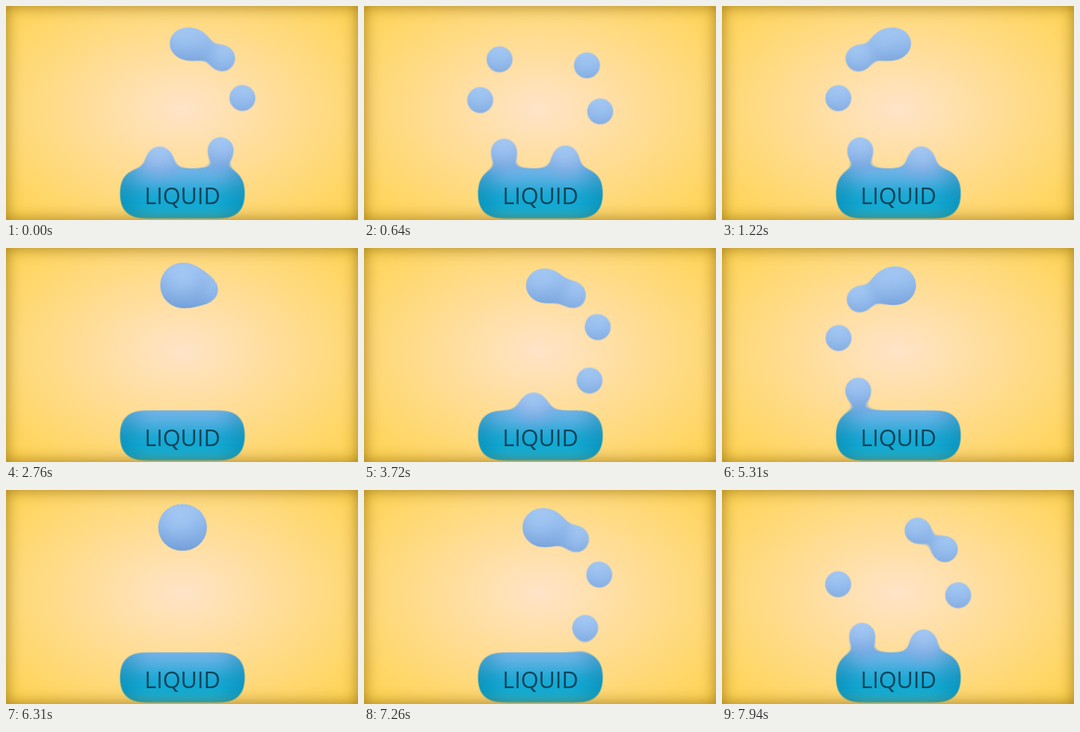
Animation, 467 px wide and 284 px high, one loop 8000 ms. Source, as an HTML page:

```html
<!DOCTYPE html>
<html lang="en">
<head>
<meta charset="utf-8">
<title>Liquid button</title>
<style>
  html, body { margin: 0; width: 100%; height: 100%; overflow: hidden; }
  body {
    background: radial-gradient(ellipse farthest-corner at 50% 48%, #ffe4c8, #ffd34e);
  }
  body::after {
    content: "";
    position: fixed;
    inset: 0;
    box-shadow: inset 0 0 20px rgba(120, 85, 0, .68);
  }
  svg { position: absolute; left: 0; top: 0; display: block; }
  text { font: 400 30.4px "Open Sans", sans-serif; fill: #0b4459; }
</style>
</head>
<body>
<svg width="467" height="284" viewBox="0 0 467 284">
  <defs>
    <filter id="soft" filterUnits="userSpaceOnUse" x="-50" y="-50" width="567" height="400" color-interpolation-filters="sRGB">
      <feGaussianBlur stdDeviation="11.4"/>
    </filter>
    <!-- Steep alpha ramp turns the overlapping soft shapes into one liquid surface -->
    <filter id="goo" filterUnits="userSpaceOnUse" x="0" y="0" width="467" height="284" color-interpolation-filters="sRGB">
      <feColorMatrix values="1 0 0 0 0  0 1 0 0 0  0 0 1 0 0  0 0 0 14 -6.5"/>
    </filter>
    <radialGradient id="water" cx=".5" cy=".36" r=".66">
      <stop offset="0" stop-color="#b6d6fb"/>
      <stop offset=".5" stop-color="#9dc3f1"/>
      <stop offset="1" stop-color="#5687cb"/>
    </radialGradient>
    <linearGradient id="pool" x2="0" y2="1">
      <stop offset="0" stop-color="#86b4ee"/>
      <stop offset=".2" stop-color="#66b2e4"/>
      <stop offset=".5" stop-color="#10a6d2"/>
      <stop offset=".75" stop-color="#0aa8d2"/>
      <stop offset="1" stop-color="#2cbce0"/>
    </linearGradient>
    <linearGradient id="ends">
      <stop offset="0" stop-color="#00789f" stop-opacity=".5"/>
      <stop offset=".2" stop-color="#00789f" stop-opacity="0"/>
      <stop offset=".8" stop-color="#00789f" stop-opacity="0"/>
      <stop offset="1" stop-color="#00789f" stop-opacity=".5"/>
    </linearGradient>
  </defs>
  <g id="liquid" filter="url(#goo)">
    <g filter="url(#soft)">
      <rect x="151" y="215.500" width="166" height="66.500" rx="22" fill="url(#pool)"/>
      <rect x="151" y="215.500" width="166" height="66.500" rx="22" fill="url(#ends)"/>
    </g>
  </g>
  <text x="234" y="262.500" text-anchor="middle">LIQUID</text>
</svg>
<script>
  const LOOP = 8000;
  const PERIOD = 3793;   // one lap plus the rest at the top
  const LAP = 2850;
  const STAGGER = 285;
  const LEAD = 1526;     // how far the first drop is into its lap at time 0
  const ORBIT = { x: 234, y: 129.5, r: 80 };

  const liquid = document.getElementById("liquid");
  const drops = Array.from({ length: 6 }, () => {
    const drop = document.createElementNS("http://www.w3.org/2000/svg", "circle");
    drop.setAttribute("r", 20.5);
    drop.setAttribute("fill", "url(#water)");
    drop.setAttribute("filter", "url(#soft)");
    return liquid.appendChild(drop);
  });

  // cubic-bezier(.42, 0, .58, 1), solved for its parameter by bisection
  function easeInOut(t) {
    let low = 0, high = 1;
    for (let i = 0; i < 24; i++) {
      const u = (low + high) / 2, v = 1 - u;
      const x = 3 * v * v * u * .42 + 3 * v * u * u * .58 + u ** 3;
      if (x < t) low = u; else high = u;
    }
    return low * low * (3 - 2 * low);
  }

  function draw(time) {
    drops.forEach((drop, i) => {
      const elapsed = (time + LEAD - i * STAGGER + PERIOD) % PERIOD;
      const angle = 2 * Math.PI * easeInOut(Math.min(elapsed / LAP, 1));
      drop.setAttribute("cx", ORBIT.x + ORBIT.r * Math.sin(angle));
      drop.setAttribute("cy", ORBIT.y - ORBIT.r * Math.cos(angle));
    });
  }

  const start = performance.now();
  function tick() {
    draw((performance.now() - start) % LOOP);
    requestAnimationFrame(tick);
  }
  tick();
</script>
</body>
</html>
```
